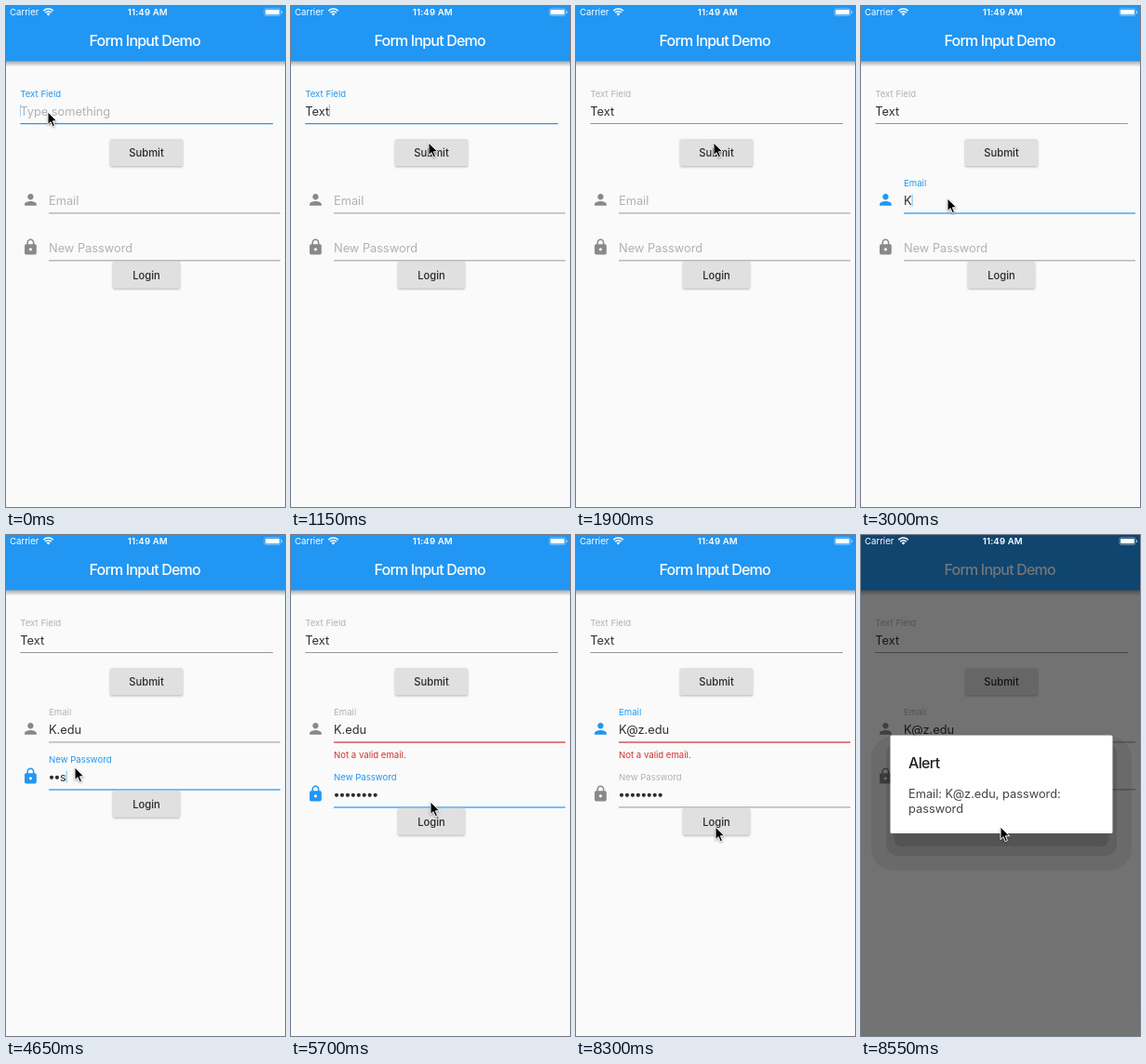
An HTML page that plays this animation: 300x539 px, repeating every 9000 ms.

```html
<!DOCTYPE html>
<html lang="en">
<head>
<meta charset="utf-8">
<title>Form Input Demo</title>
<style>
  html, body { margin: 0; width: 100%; height: 100%; overflow: hidden; background: #fafafa; }
  svg { display: block; width: 300px; height: 539px; font-family: Inter, "Liberation Sans", sans-serif; }
  .btn { fill: #e0e0e0; filter: drop-shadow(0 1px .8px rgba(0, 0, 0, .28)); }
  .btn.raised { filter: drop-shadow(0 2px 2px rgba(0, 0, 0, .4)); }
  .mouse { filter: drop-shadow(0 1px 1px rgba(0, 0, 0, .35)); }
</style>
</head>
<body>
<svg id="stage" viewBox="0 0 300 539"></svg>
<script>
const LOOP = 9000, BLUE = '#2196f3', RED = '#d32f2f';
const INK = 'rgba(0,0,0,.82)', FAINT = 'rgba(0,0,0,.29)', ICON = '#898989';
const PERSON = 'M12 12c2.21 0 4-1.79 4-4s-1.79-4-4-4-4 1.79-4 4 1.79 4 4 4zm0 2c-2.67 0-8 1.34-8 4v2h16v-2c0-2.66-5.33-4-8-4z';
const LOCK = 'M18 8h-1V6c0-2.76-2.24-5-5-5S7 3.24 7 6v2H6c-1.1 0-2 .9-2 2v10c0 1.1.9 2 2 2h12c1.1 0 2-.9 2-2V10c0-1.1-.9-2-2-2zm-6 9c-1.1 0-2-.9-2-2s.9-2 2-2 2 .9 2 2-.9 2-2 2zm3.1-9H8.9V6c0-1.71 1.39-3.1 3.1-3.1 1.71 0 3.1 1.39 3.1 3.1v2z';
const DOT = 5.95;

// Pointer moves: start time, steps, destination
const MOVES = [
  [850, 4, 148, 147], [2000, 4, 93, 207], [3750, 3, 74, 250], [5300, 3, 150, 287],
  [5900, 5, 53, 208], [7000, 3, 150, 306], [7800, 4, 150, 314]
];

const stage = document.getElementById('stage');
const pen = document.createElement('canvas').getContext('2d');
let t = 0;

// Progress 0..1 in n jumps of 100 ms, the first at `start`
const step = (start, n) => Math.max(0, Math.min(n, Math.floor((t - start) / 100) + 1)) / n;
const within = (a, b) => t >= a && t < b;
const count = times => times.filter(x => t >= x).length;
const mix = (a, b, p) => a + (b - a) * p;

function width(s) {
  pen.font = '12.8px Inter, "Liberation Sans", sans-serif';
  return pen.measureText(s).width;
}

const text = (x, y, s, size, fill, extra = '') =>
  `<text x="${x}" y="${y}" font-size="${size}" fill="${fill}" ${extra}>${s}</text>`;
const rect = (x, y, w, h, fill, extra = '') =>
  `<rect x="${x}" y="${y}" width="${w}" height="${h}" fill="${fill}" ${extra}/>`;
const caret = (x, y, alpha) => rect(x, y - 11.4, 1, 13, BLUE, `opacity="${alpha}"`);
const icon = (path, y, fill) =>
  `<path d="${path}" fill="${fill}" transform="translate(16.8 ${y}) scale(.8)"/>`;
const button = (x, y, w, label, raised) =>
  `<rect class="btn ${raised ? 'raised' : ''}" x="${x}" y="${y}" width="${w}" height="29" rx="1.6"/>` +
  text(x + w / 2, y + 18.8, label, 11.2, INK, 'font-weight="500" text-anchor="middle"');

// Label (floating by p), hint and underline of one field
function field({ x, y, right, label, hint, p, hintAlpha, focus, error }) {
  const line = error ? RED : focus ? BLUE : 'rgba(0,0,0,.4)';
  return text(x, mix(y, y - 19.7, p), label, mix(12.8, 9.6, p), focus ? BLUE : FAINT) +
    text(x, y, hint, 12.8, FAINT, `opacity="${hintAlpha}"`) +
    rect(x, y + 8.4, right - x, focus || error ? 1.2 : 1, line);
}

function textRow() {
  const y = 117.6, focus = t < 1250;
  const s = 'Text'.slice(0, count([400, 500, 600, 700]));
  const alpha = t < 250 ? .4 : within(400, 1250) ? .6 : 0;
  return field({ x: 15.3, y, right: 287, label: 'Text Field', hint: 'Type something', p: 1,
      hintAlpha: 1 - step(400, 2), focus }) +
    text(15.3, y, s, 12.8, INK) + caret(15 + width(s), y, alpha);
}

function emailRow(error) {
  const x = 46, y = 214, focus = within(2400, 4100) || within(6400, 8450);
  let s = 'K.edu'.slice(0, count([2900, 3100, 3200, 3300, 3450])), before = s;
  if (t >= 6400) {
    before = 'K@z'.slice(0, 1 + count([7350, 7550]));
    s = before + '.edu';
  }
  const on = within(2500, 2650) || within(2900, 3550) || within(6700, 7650);
  return icon(PERSON, 198.8, focus ? BLUE : ICON) +
    field({ x, y, right: 295, label: 'Email', hint: 'Type your email', p: step(2400, 2),
      hintAlpha: step(2400, 2) < 1 ? 0 : 1 - step(2900, 2), focus, error: error > 0 }) +
    text(x, y, s, 12.8, INK) + caret(x + width(before), y, on ? .6 : 0) +
    text(x, 240.2, 'Not a valid email.', 9.6, RED, `opacity="${error}"`);
}

function passwordRow(shift) {
  const x = 46, y = 265 + shift, focus = within(4100, 6400);
  const n = count([4350, 4550, 4650, 4750, 4850, 4950, 5050, 5150]);
  const last = t < 5300 && n ? 'password'[n - 1] : '';
  const dots = last ? n - 1 : n;
  let out = icon(LOCK, 249.8 + shift, focus ? BLUE : ICON) +
    field({ x, y, right: 295, label: 'New Password', hint: 'Type your password', p: step(4100, 2),
      hintAlpha: step(4100, 2) < 1 ? 0 : 1 - step(4350, 2), focus });
  for (let i = 0; i < dots; i++)
    out += `<circle cx="${x + 3 + i * DOT}" cy="${y - 4.2}" r="2.1" fill="${INK}"/>`;
  const end = x + dots * DOT;
  return out + text(end, y, last, 12.8, INK) +
    caret(end + width(last), y, within(4200, 5600) ? .6 : 0);
}

function dialog(x, y, w, h, lines, alpha) {
  const shade = (out, top, bottom, r, a) =>
    rect(x - out, y + top, w + 2 * out, h + bottom - top, `rgba(0,0,0,${a})`, `rx="${r}"`);
  return `<g opacity="${alpha}">` + rect(0, 0, 300, 539, 'rgba(0,0,0,.54)') +
    shade(20.5, 1, 40, 24, .07) + shade(4.5, 8, 24, 12, .1) + shade(-4, 14, 14, 8, .13) +
    rect(x, y, w, h, '#fff', 'rx="1.6"') +
    text(x + 19.5, y + 35.2, 'Alert', 16, '#212121', 'font-weight="500" letter-spacing="-.65"') +
    lines.map((s, i) => text(x + 19.5, y + 67.6 + i * 15.4, s, 12.8, '#444')).join('') + '</g>';
}

function statusBar() {
  const arc = r => `<path d="M${45.5 - r * .72} ${10.4 - r * .7}A${r} ${r} 0 0 1 ${45.5 + r * .72} ${10.4 - r * .7}" fill="none" stroke="#fff" stroke-width="1.6"/>`;
  return text(4, 10, 'Carrier', 9.6, '#fff') +
    arc(7.3) + arc(4.6) + '<path d="M45.5 10.6l-1.9-2.2a2.7 2.7 0 0 1 3.8 0z" fill="#fff"/>' +
    text(152.3, 10, '11:49 AM', 9.6, '#fff', 'font-weight="600" text-anchor="middle" letter-spacing=".15"') +
    rect(277.8, 2.8, 17.4, 7.6, 'none', 'rx="2" stroke="#fff" stroke-opacity=".55" stroke-width=".7"') +
    rect(279, 4, 15, 5.2, '#fff', 'rx="1"') + rect(296, 5.2, 1.2, 2.8, '#fff', 'rx=".6" opacity=".6"');
}

function pointer() {
  let x = 45, y = 114;
  for (const [start, n, toX, toY] of MOVES) {
    const p = step(start, n), e = p * p * (3 - 2 * p);
    x = mix(x, toX, e);
    y = mix(y, toY, e);
  }
  return `<path class="mouse" transform="translate(${x} ${y})" d="M0 0V13.6L3.1 10.7 5.2 15.7 7.5 14.7 5.4 9.8H9.7Z" fill="#000" stroke="#fff" stroke-width="1" stroke-linejoin="round"/>`;
}

function draw(now) {
  t = now % LOOP;
  const error = step(5600, 2) - step(8450, 2), shift = 19 * error;
  const first = step(1250, 2) - step(1800, 2), second = step(8450, 2);
  stage.innerHTML =
    '<defs><linearGradient id="fade" x2="0" y2="1"><stop stop-color="#000" stop-opacity=".34"/><stop offset="1" stop-color="#000" stop-opacity="0"/></linearGradient></defs>' +
    rect(0, 0, 300, 539, '#fafafa') + rect(0, 59, 300, 6.5, 'url(#fade)') + rect(0, 0, 300, 59.4, BLUE) +
    text(149.2, 43, 'Form Input Demo', 16, '#fff', 'font-weight="500" text-anchor="middle" letter-spacing="-.8"') +
    textRow() + button(112, 143.3, 78, 'Submit', first > 0) +
    emailRow(error) + passwordRow(shift) + button(115, 274.7 + shift, 72, 'Login', second > 0) +
    (first > 0 ? dialog(37.5, 223.3, 227, 90, ['You typed Text'], first) : '') +
    (second > 0 ? dialog(31.5, 215.5, 239, 105.6, ['Email: K@z.edu, password:', 'password'], second) : '') +
    statusBar() + pointer();
}

const begin = performance.now();
function tick() {
  draw(performance.now() - begin);
  requestAnimationFrame(tick);
}
tick();
</script>
</body>
</html>
```
